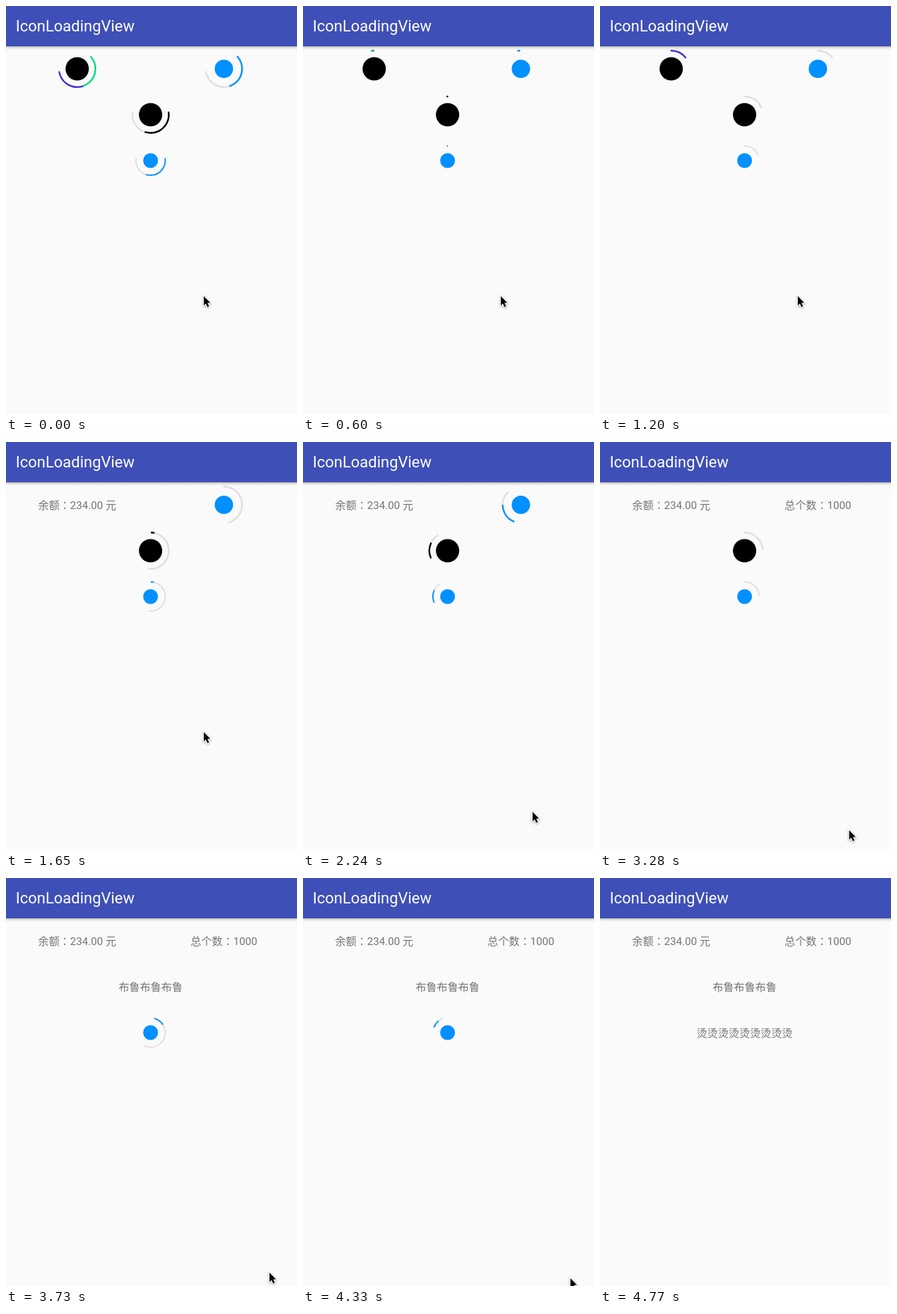
Write an HTML page with a canvas that moves like this. It is 412 px wide and 578 px high and loops after 5.24 s.

```html
<!DOCTYPE html>
<html lang="zh-Hant">
<head>
<meta charset="utf-8">
<title>IconLoadingView</title>
<style>
html, body { margin: 0; width: 100%; height: 100%; overflow: hidden; background: #fafafa; }
canvas { display: block; }
</style>
</head>
<body>
<canvas id="stage" width="412" height="578"></canvas>
<script>
const ctx = document.getElementById('stage').getContext('2d');
const LOOP = 5240, LAST = 4770, SPIN = 2000, BAR = 57;
const FONT = "Roboto, 'Noto Sans CJK TC', 'Noto Sans CJK JP', 'Noto Sans CJK', sans-serif";
const BLUE = '#0090ff', TRACK = '#dfdfdf';

// Each loader gives way to its text at time `done`.
const loaders = [
  { x: 100.8, y: 89, r: 25.8, icon: 16.5, fill: '#000', bar: '#00d97c', track: '#4a2bd8', phase: .647, done: 1560, text: '余额：234.00 元' },
  { x: 308.5, y: 89, r: 25.8, icon: 13, fill: BLUE, bar: BLUE, track: TRACK, phase: .647, done: 2560, text: '总个数：1000' },
  { x: 204.7, y: 154, r: 25.8, icon: 16.5, fill: '#000', bar: '#000', track: TRACK, phase: .684, done: 3560, text: '布鲁布鲁布鲁' },
  { x: 204.7, y: 219, r: 20.8, icon: 10.5, fill: BLUE, bar: BLUE, track: TRACK, phase: .684, done: 4560, text: '烫'.repeat(9) }
];

// Pointer path: time, x, y
const path = [[0, 280, 411], [1650, 280, 411], [2240, 325, 524], [2830, 328, 535],
  [3430, 361, 555], [3730, 373, 559], [4480, 380, 569], [4630, 380, 569]];
const arrow = [[0, 0], [0, 13.2], [3, 10.4], [5.2, 15.4], [7.5, 14.4], [5.3, 9.5], [9.4, 9.5]];

function disc(x, y, r, color) {
  ctx.fillStyle = color;
  ctx.beginPath();
  ctx.arc(x, y, r, 0, Math.PI * 2);
  ctx.fill();
}

function arc(l, from, to, color) {
  if (to - from < .0005) return;
  const angle = turn => (turn - .25) * Math.PI * 2;
  ctx.strokeStyle = color;
  ctx.lineWidth = l.r * .092;
  ctx.lineCap = 'round';
  ctx.beginPath();
  ctx.arc(l.x, l.y, l.r, angle(from), angle(to));
  ctx.stroke();
}

function label(text, x, y, size, color, align) {
  ctx.font = `${size}px ${FONT}`;
  ctx.textAlign = align;
  ctx.fillStyle = color;
  ctx.fillText(text, x, y);
}

function drawLoader(l, t) {
  if (t >= l.done) return label(l.text, l.x, l.y + 6, 15.1, '#747474', 'center');
  const p = (l.phase + t / SPIN) % 1;
  const head = (1 - Math.cos(Math.PI * p)) / 2;
  const mid = head - Math.min(head, 1 - head);
  const tail = mid - .7 * Math.min(mid, 1 - mid);
  arc(l, mid, head, l.track);
  arc(l, tail, mid, l.bar);
  disc(l.x, l.y, l.icon, l.fill);
}

function drawPointer(t) {
  const i = path.findIndex(k => k[0] > t);
  if (i < 0) return;
  const [a, b] = [path[i - 1], path[i]];
  const u = (t - a[0]) / (b[0] - a[0]);
  ctx.save();
  ctx.translate(a[1] + (b[1] - a[1]) * u, a[2] + (b[2] - a[2]) * u);
  ctx.beginPath();
  arrow.forEach(([x, y]) => ctx.lineTo(x, y));
  ctx.closePath();
  ctx.shadowColor = 'rgba(0,0,0,.35)';
  ctx.shadowBlur = 3;
  ctx.shadowOffsetY = 1;
  ctx.strokeStyle = '#fff';
  ctx.lineWidth = 2;
  ctx.stroke();
  ctx.shadowColor = 'transparent';
  ctx.fillStyle = '#000';
  ctx.fill();
  ctx.restore();
}

function drawBar() {
  const shade = ctx.createLinearGradient(0, BAR, 0, BAR + 5);
  shade.addColorStop(0, 'rgba(0,0,0,.3)');
  shade.addColorStop(.4, 'rgba(0,0,0,.1)');
  shade.addColorStop(1, 'rgba(0,0,0,0)');
  ctx.fillStyle = shade;
  ctx.fillRect(0, BAR, 412, 5);
  ctx.fillStyle = '#3e4fb7';
  ctx.fillRect(0, 0, 412, BAR);
  label('IconLoadingView', 13.7, 36, 22, '#fff', 'left');
}

// The picture advances in steps of 150 ms, three of them 10 ms shorter.
function stepTime(t) {
  const lag = 10 * [1790, 2830, LAST].filter(s => t >= s).length;
  return Math.min(LAST, Math.floor((t + lag) / 150) * 150 - lag);
}

function draw(now) {
  const t = stepTime(now % LOOP);
  ctx.fillStyle = '#fafafa';
  ctx.fillRect(0, 0, 412, 578);
  drawBar();
  loaders.forEach(l => drawLoader(l, t));
  drawPointer(t);
}

const start = performance.now();
function tick() {
  draw(performance.now() - start);
  requestAnimationFrame(tick);
}
tick();
</script>
</body>
</html>
```
